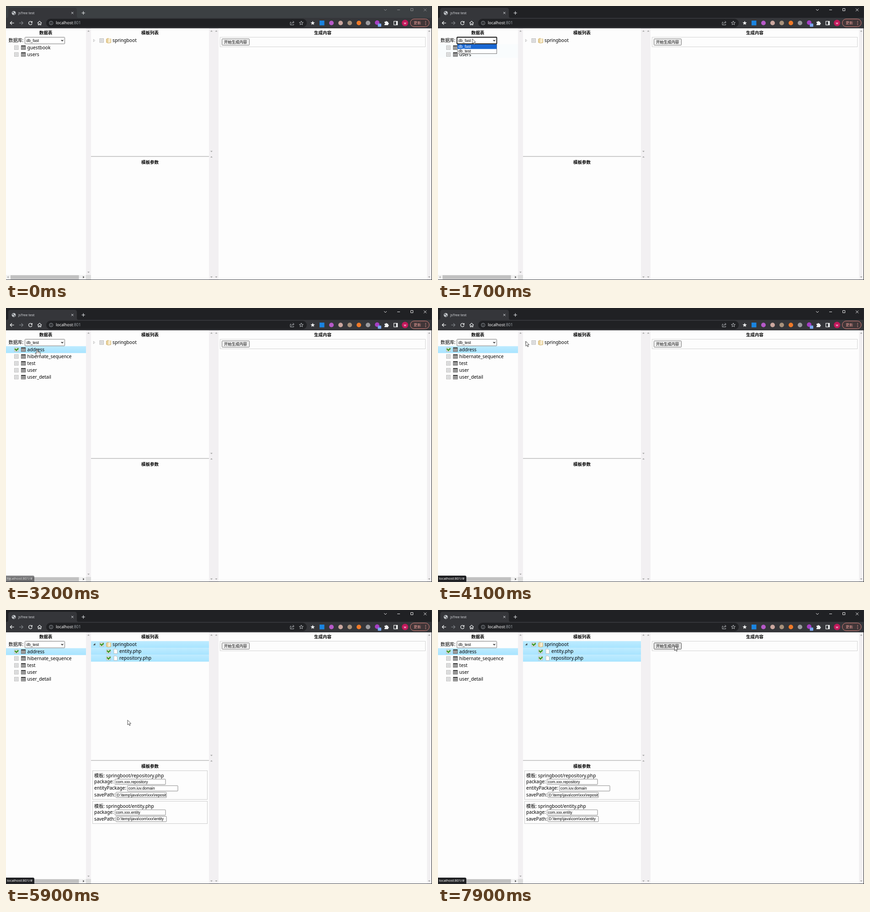
Write an HTML page that moves like this. It is 932 px wide and 601 px high and loops after 8 s.

```html
<!DOCTYPE html>
<html lang="zh">
<head>
<meta charset="utf-8">
<title>jsTree test</title>
<style>
html, body { margin: 0; width: 100%; height: 100%; overflow: hidden; background: #fdfdfd; }
svg { display: block; width: 932px; height: 601px; }
text { font-family: "Noto Sans", "Noto Sans CJK SC", "Noto Sans CJK", sans-serif; white-space: pre; }
.form { font-family: "Liberation Sans", "Noto Sans CJK SC", "Noto Sans CJK", sans-serif; }
</style>
</head>
<body>
<svg id="stage" viewBox="0 0 932 601" xmlns="http://www.w3.org/2000/svg"></svg>
<script>
const LOOP = 8000, STEP = 100;
const BODY = 10.2, FORM = 8.4;

const text = (x, y, s, size = BODY, fill = '#000', extra = '') =>
  `<text x="${x}" y="${y}" font-size="${size}" fill="${fill}" ${extra}>${s}</text>`;
const rect = (x, y, w, h, fill, extra = '') =>
  `<rect x="${x}" y="${y}" width="${w}" height="${h}" fill="${fill}" ${extra}/>`;
const box = (x, y, w, h, fill, stroke, extra = '') =>
  rect(x + .5, y + .5, w - 1, h - 1, fill, `stroke="${stroke}" ${extra}`);
const line = (d, stroke, width = 1, extra = '') =>
  `<path d="${d}" fill="none" stroke="${stroke}" stroke-width="${width}" ${extra}/>`;
const shape = (d, fill, extra = '') => `<path d="${d}" fill="${fill}" ${extra}/>`;
const dot = (x, y, r, fill, extra = '') => `<circle cx="${x}" cy="${y}" r="${r}" fill="${fill}" ${extra}/>`;
const group = (id, content, extra = '') => `<g id="${id}" ${extra}>${content}</g>`;
const form = (x, y, s, fill = '#000', extra = '') => text(x, y, s, FORM, fill, `class="form" ${extra}`);
const heading = (x, y, s) => text(x, y, s, 9.5, '#000', 'font-weight="700" text-anchor="middle"');
const up = (x, y) => shape(`M${x - 2.5} ${y + 1.3}h5l-2.5-2.8z`, '#a3a3a3');
const down = (x, y) => shape(`M${x - 2.5} ${y - 1.3}h5l-2.5 2.8z`, '#a3a3a3');

function starPath(x, y, r) {
  return 'M' + Array.from({ length: 10 }, (_, i) => {
    const a = Math.PI * (i / 5 - .5), k = i % 2 ? r * .42 : r;
    return `${(x + k * Math.cos(a)).toFixed(2)} ${(y + k * Math.sin(a)).toFixed(2)}`;
  }).join('L') + 'z';
}

function titleBar() {
  const controls = line('M827 7l3 3 3-3M856 8.5h6M885.5 5.5h5v5h-5zM914 5.5l6 6M920 5.5l-6 6', '#fff', .9);
  return rect(0, 0, 932, 27, '#3c4043', 'id="bar"') +
    shape('M0 26.5q5 0 5-5V9q0-5 5-5h140q5 0 5 5v12.5q0 5 5 5z', '#35363a') +
    dot(17, 15.3, 4.4, '#c4c7cb') +
    shape('M13.6 13.4q3-2 3.4 0t-1.8 2.1zM17.4 16.3l2.7-.8-1 3-2 .5z', '#4a4d51') +
    text(27, 18, 'jsTree test', 7.4, '#dfe1e5') +
    line('M143 13l4.5 4.5M147.500 13l-4.500 4.500', '#dfe1e5', 1) +
    line('M165.500 15.300h7.500M169.250 11.500v7.500', '#e8eaed', 1.1) +
    group('controls', controls);
}

function toolbar() {
  const white = '#f1f3f4', gray = '#9aa0a6';
  const extensions = [[712, '#b659c9'], [732, '#cba79f'], [752, '#a8927c'], [772, '#f07a28'], [792, '#9b9b9f']];
  return rect(0, 26, 932, 23, '#35363a') +
    line('M17.500 37.300h-8M13 33.500l-3.800 3.800 3.800 3.800', white, 1.3) +
    line('M29 37.300h8M33.500 33.500l3.800 3.800-3.800 3.800', '#7d8186', 1.2) +
    line('M56.500 35.200a3.800 3.800 0 1 0 .6 3', white, 1.3) + shape('M57.800 32.800v4h-4z', white) +
    line('M69 37.500l4.500-4.300 4.500 4.300M70.500 36.800v4.700h2v-2.800h2v2.800h2v-4.700', white, 1.1) +
    rect(88, 28, 570, 18.500, '#202124', 'rx="9.250"') +
    dot(98.700, 37.300, 4, 'none', `stroke="${gray}"`) +
    line('M98.700 36.700v2.800M98.700 34.800v1', gray, 1) +
    text(109, 40.300, 'localhost<tspan fill="#9aa0a6">:801</tspan>', 8.86, '#fff') +
    line('M624 35.500h-2v6h7.500v-2M624.500 39.500q.5-4 5-4M627.500 33l2.800 2.500-2.800 2.500', '#c4c7cb', .9) +
    shape(starPath(646, 37.500, 4.600), 'none', 'stroke="#c4c7cb" stroke-width=".9"') +
    shape(starPath(671, 37.500, 5), white) +
    rect(686, 32, 10.500, 10.500, '#1a84e0') +
    extensions.map(([x, c]) => dot(x, 37.300, 5, c)).join('') +
    dot(812, 36.500, 5, '#a63fc4') + rect(813.500, 38.500, 7.500, 7, '#7ba7f0', 'rx="1.200"') +
    shape('M828 34.500h2.500a1.600 1.600 0 1 1 3.200 0h2.300v2.300a1.600 1.600 0 1 1 0 3.200v2h-8v-2.300a1.500 1.500 0 0 0 0-3z', white) +
    box(848, 33, 9, 9, 'none', white, 'stroke-width="1.200"') + rect(853.500, 33.500, 3, 8, white) +
    dot(873, 37.300, 7, '#c2185b') +
    text(873, 39.600, 'w', 7, '#fff', 'text-anchor="middle"') +
    rect(884.500, 28.500, 41.500, 17, '#413638', 'rx="8.500" stroke="#d9827b"') +
    text(892, 40.200, '更新', 7.9, '#f0a29c') +
    [33.800, 37.300, 40.800].map(y => dot(918, y, .85, '#f0a29c')).join('');
}

function scrollbars() {
  const track = '#f2f0f2';
  return rect(175, 49, 11, 541, track) + up(180.500, 55) + down(180.500, 584) +
    rect(444, 49, 21, 552, track) +
    up(449.500, 55) + down(449.500, 319) + up(449.500, 331) + down(449.500, 594.500) +
    up(460, 55) + down(460, 594.500) +
    rect(921, 49, 10, 552, track) + up(926, 55) + down(926, 594.500) +
    rect(0, 590, 175, 10, '#f1f1f1') + rect(10, 590.500, 149.500, 9, '#c1c1c1') +
    rect(175, 590, 11, 10, '#dcdcdc') +
    shape('M5.500 592.300v5l-2.800-2.500z', '#a3a3a3') + shape('M168.500 592.300v5l2.800-2.500z', '#404040');
}

const checkbox = (x, y) => rect(x + .5, y + .5, 8.500, 8.500, '#e6e6e6', 'stroke="#b4b4b4" stroke-width=".9"') +
  rect(x + 2.200, y + 2.200, 5, 5, '#d9dadb');
const tick = (x, y) => line(`M${x + 1.500} ${y + 3.500}l3.200 3.300 4.300-4.300`, '#2f8f1c', 2.600) +
  line(`M${x + 1.800} ${y + 3.200}l2.900 2.800 4-4`, '#63bd42', .8);
const table = (x, y) => rect(x, y, 10, 9.500, '#333') +
  [0, 1, 2].map(r => [0, 1, 2].map(c =>
    rect(x + .8 + c * 3, y + 2.300 + r * 2.400, 2.300, 1.600, '#f7f7f7')).join('')).join('');
const rowTop = i => 83.700 + i * 15.100;
const tableRow = (name, i) => {
  const y = rowTop(i);
  return checkbox(18, y + 2.800) + table(33, y + 2.800) + text(46.500, y + 11.200, name);
};
const fileRow = (name, y) => checkbox(219.500, y - 8.300) +
  shape(`M236 ${y - 8.500}h5l2.500 2.500v7.500h-7.500z`, '#fff', 'stroke="#adadad" stroke-width=".8"') +
  text(248, y, name);
const clickedRow = (x, y, w) => rect(x, y, w, 15.100, 'url(#clicked)');

function databasePane() {
  return heading(87, 62.300, '数据表') + text(5.500, 79.200, '数据库:', 10) +
    [0, 1].map(i => rect(0, rowTop(i), 175, 15.100, '#e7f4f9', `id="hover${i}"`)).join('') +
    group('picked', clickedRow(0, rowTop(0), 175)) +
    group('tablesA', ['guestbook', 'users'].map(tableRow).join('')) +
    group('tablesB', ['address', 'hibernate_sequence', 'test', 'user', 'user_detail'].map(tableRow).join('')) +
    group('pickedTick', tick(18, rowTop(0) + 2.300)) +
    rect(41.500, 68.500, 87, 14.500, '#fff', 'id="select" stroke="#767676" rx="1"') +
    form(44.500, 78.700, '', '#000', 'id="dbName"') +
    line('M120.800 74.500l2.200 2.300 2.200-2.300', '#222', 1.300) +
    group('menu', box(42, 83.500, 87, 21.500, '#fff', '#777') +
      rect(42.500, 84, 86, 10.300, '#1967d2', 'id="menuPick"') +
      form(44.500, 92, 'db_fast', '#000', 'id="opt0"') + form(44.500, 102.200, 'db_test', '#000', 'id="opt1"'));
}

function templatePane() {
  const folder = shape('M219.500 72.500l4-2 1 1.500h5v8.500l-6 1-4-1.500z', '#e8cf96', 'stroke="#c9a85f" stroke-width=".7"') +
    shape('M223.500 72.500l5-1.500v8.500l-5 1.500z', '#f7ecd0');
  return heading(315, 62.300, '模板列表') +
    rect(186, 68.200, 258, 15.100, '#e7f4f9', 'id="folderHover"') +
    group('filesPicked', [68.200, 83.200, 98.200].map(y => clickedRow(186, y, 258)).join('')) +
    shape('M191.500 73l3.200 2.700-3.200 2.700z', '#fff', 'id="closed" stroke="#b0b0b0" stroke-width=".8"') +
    group('files', shape('M195.300 72.800v4.500h-4.700z', '#404040') +
      fileRow('entity.php', 94.200) + fileRow('repository.php', 109.200)) +
    checkbox(204.500, 71) + folder + text(233, 79.300, 'springboot') +
    group('filesTick', tick(204.500, 70.500) + tick(219.500, 85.500) + tick(219.500, 100.500)) +
    rect(186, 329.500, 258, 1, '#999');
}

const field = (label, value, x, y) => text(193, y, label) +
  `<svg x="${x}" y="${y - 10}" width="112" height="14">` +
  box(0, .5, 111.500, 12.800, '#fff', '#858585', 'rx="1"') +
  `<svg x="2" width="108" height="14">${form(.6, 9.800, value)}</svg></svg>`;

function paramPane() {
  return heading(315, 346, '模板参数') + group('params',
    box(189, 352, 252, 64, '#fdfdfd', '#ccc') +
    text(193, 366.500, '模板: springboot/repository.php') +
    field('package:', 'com.xxx.repository', 238, 380) +
    field('entityPackage:', 'com.iuv.domain', 265, 394.300) +
    field('savePath:', 'D:\\temp\\java\\com\\xxx\\repository', 240, 408.800) +
    box(189, 419, 252, 50, '#fdfdfd', '#ccc') +
    text(193, 433.500, '模板: springboot/entity.php') +
    field('package:', 'com.xxx.entity', 238, 447.200) +
    field('savePath:', 'D:\\temp\\java\\com\\xxx\\entity', 240, 461.500));
}

function outputPane() {
  return heading(693, 62.300, '生成内容') + box(468, 68, 450, 22, '#fdfdfd', '#d3d3d3') +
    rect(472.500, 72, 60, 14, '#efefef', 'id="button" stroke="#767676" rx="1.500"') +
    form(477, 82.200, '开始生成内容');
}

function pointers() {
  const arrow = shape('M0 0v10.500l2.500-2.300 1.700 4 1.700-.8-1.700-3.800h3.300z', '#fff', 'stroke="#222" stroke-width=".8"');
  const hand = shape('M-1.200 1q1.200-1.800 2.400 0v4.200q1.500-.9 2 .3 1.500-.5 2 .6 1.800-.3 1.800 1.200v3.500l-1.300 3.700h-6l-3.500-5q-.8-1.800.8-1.900l1.800 1.500z',
    '#fff', 'stroke="#222" stroke-width=".8"') + line('M1.300 5.500v3M3.300 6v2.500M5.200 6.500v2', '#222', .6);
  return group('arrow', arrow) + group('hand', hand);
}

const stage = document.getElementById('stage');
stage.innerHTML =
  `<defs><linearGradient id="clicked" x2="0" y2="1"><stop stop-color="#beebff"/><stop offset="1" stop-color="#a8e4ff"/></linearGradient></defs>` +
  rect(0, 0, 932, 601, '#fdfdfd') + titleBar() + toolbar() + scrollbars() +
  databasePane() + templatePane() + paramPane() + outputPane() +
  rect(0, 600, 932, 1, '#3a3d45') + rect(931, 0, 1, 601, '#2b2c2f') +
  group('status', shape('M0 587h59q3 0 3 3v10.500h-62z', '#202124') + text(2, 596.300, 'localhost:801/#', 7.75, '#fff')) +
  pointers();

const el = id => document.getElementById(id);
const show = (id, on) => el(id).setAttribute('visibility', on ? 'visible' : 'hidden');
const set = (id, name, value) => el(id).setAttribute(name, value);

// pointer tip: time, x, y
const path = [
  [200, 921, 15], [300, 592, 110], [400, 504, 143], [500, 373, 185], [600, 227, 208], [700, 227, 208],
  [800, 252, 190], [1100, 98, 139], [1200, 88, 113], [1400, 73, 69], [1600, 73, 71], [1700, 75, 72],
  [1800, 77, 90], [2000, 77, 90], [2300, 89, 99.500], [2400, 88, 99], [2900, 70, 91], [3200, 68, 90.500],
  [3700, 272, 97], [3900, 272, 97], [4100, 192, 73], [4200, 208, 73], [4300, 208, 73], [4600, 211, 72.500],
  [5600, 211, 72.500], [5900, 266, 241.500], [6100, 268, 304], [6500, 262, 396], [6600, 241, 395],
  [6900, 330, 365], [7200, 544, 260], [7400, 564, 196], [7600, 545, 165], [7800, 507, 113], [7900, 517.500, 78.500]
];

function pointerAt(t) {
  const i = path.findIndex(p => p[0] > t);
  if (i < 0) return path[path.length - 1].slice(1);
  const a = path[Math.max(0, i - 1)], b = path[i];
  const k = Math.max(0, (t - a[0]) / (b[0] - a[0]));
  return [a[1] + (b[1] - a[1]) * k, a[2] + (b[2] - a[2]) * k];
}

function draw(time) {
  const t = Math.floor(time / STEP) * STEP;
  const within = (a, b) => t >= a && t < b;

  const active = t >= 1600;
  set('bar', 'fill', active ? '#202124' : '#3c4043');
  set('controls', 'opacity', active ? 1 : .45);

  const focused = within(1600, 3000);
  set('select', 'stroke', focused ? '#101010' : '#767676');
  set('select', 'stroke-width', focused ? 1.8 : 1);
  el('dbName').textContent = t < 2100 ? 'db_fast' : 'db_test';
  show('menu', within(1700, 2100));
  const second = t >= 1800;
  set('menuPick', 'y', second ? 94.300 : 84);
  set('opt0', 'fill', second ? '#000' : '#fff');
  set('opt1', 'fill', second ? '#fff' : '#000');

  const loaded = t >= 2400, picked = t >= 3100;
  show('tablesA', !loaded);
  show('tablesB', loaded);
  show('picked', picked);
  show('pickedTick', picked);
  set('hover0', 'opacity', within(2200, 2400) || within(2700, 3100) ? 1 : within(1300, 2200) ? .22 : 0);
  set('hover1', 'opacity', within(2400, 2700) ? 1 : within(1200, 2400) ? .22 : 0);

  const open = t >= 4200, chosen = t >= 5400;
  show('closed', !open);
  show('files', open);
  show('folderHover', within(5300, 5400));
  show('filesPicked', chosen);
  show('filesTick', chosen);
  show('params', t >= 5700);
  set('status', 'opacity', t < 2200 ? 0 : t < 2300 ? .3 : t < 3300 ? .55 : 1);

  const over = t >= 7900;
  set('button', 'fill', over ? '#e5e5e5' : '#efefef');
  set('button', 'stroke', over ? '#4f4f4f' : '#767676');

  const hand = within(2200, 3300) || within(4600, 5700);
  const at = `translate(${pointerAt(t).join(' ')})`;
  set('arrow', 'transform', at);
  set('hand', 'transform', at);
  show('arrow', t >= 200 && !hand);
  show('hand', hand);
}

const start = performance.now();
function tick_() {
  draw((performance.now() - start) % LOOP);
  requestAnimationFrame(tick_);
}
tick_();
</script>
</body>
</html>
```
